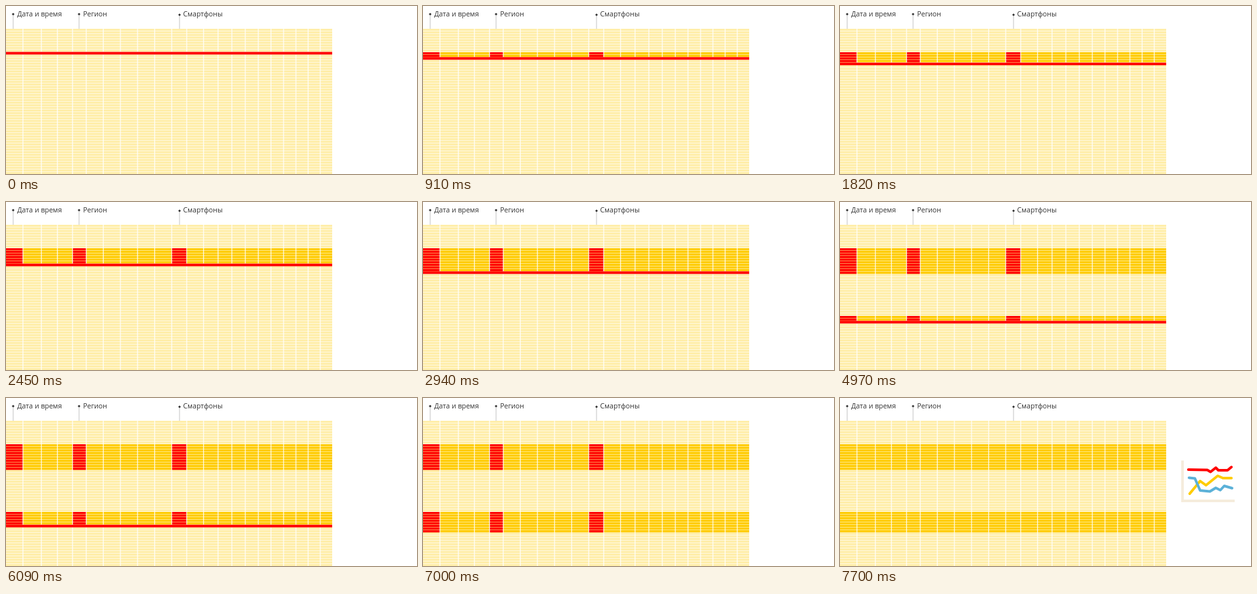
Recreate the animation shown at these times as an HTML page with a canvas. Size 630 px wide and 258 px high, loop 8.05 s.

```html
<!DOCTYPE html>
<html lang="ru">
<head>
<meta charset="utf-8">
<style>
html, body { margin: 0; width: 100%; height: 100%; overflow: hidden; background: #fff; }
canvas { display: block; width: 630px; height: 258px; }
</style>
</head>
<body>
<canvas id="stage" width="630" height="258"></canvas>
<script>
const ctx = document.getElementById('stage').getContext('2d');
const LOOP = 8050, TICK = 70, ROW_TIME = 350;
const TOP = 35, PITCH = 4, ROW_HEIGHT = 3.4, ROWS = 56, WIDTH = 500;
const RED = '#ff0000', YELLOW = '#ffcc00', PALE = '#ffeeaa', BLUE = '#5bb1d8';

const keyColumns = [
  { left: 0, right: 26 },
  { left: 102, right: 123 },
  { left: 254, right: 277 }
];
// Plain columns share the space after each key column; bend < 1 narrows them to the right.
const columnGroups = [
  { left: 26, right: 102, parts: 3, bend: 0.9 },
  { left: 123, right: 254, parts: 5, bend: 1 },
  { left: 277, right: WIDTH, parts: 11, bend: 0.9 }
];
const blocks = [
  { first: 9, count: 10, start: 140, last: 9, land: 2940, end: 4130 },
  { first: 35, count: 8, start: 4130, last: 8, land: 6930, end: 7000 }
];
const labels = [
  { text: 'Дата и время', x: 11, y: 12.5, gap: 6.2 },
  { text: 'Регион', x: 112, y: 12.5, gap: 6.2 },
  { text: 'Смартфоны', x: 266, y: 13.5, gap: 5.6 }
];
const curves = [
  { color: RED, points: [534, 110, 563, 110.5, 568, 113.5, 576, 107, 580, 111, 594, 111, 600, 106] },
  { color: YELLOW, points: [536, 147, 552, 127.5, 561, 134, 579, 119.5, 587, 123, 600, 123] },
  { color: BLUE, points: [535, 122.5, 544, 123.5, 552, 142, 567, 143.5, 576, 138, 583, 141.5, 589, 135, 601, 138.5] }
];

const clamp = v => Math.max(0, Math.min(1, v));
const rowY = row => TOP + row * PITCH;

function fillRows(first, count, left, right, color) {
  ctx.fillStyle = color;
  for (let row = first; row < first + count; row++) {
    ctx.fillRect(left, rowY(row), right - left, ROW_HEIGHT);
  }
}

// The bar rests on a row, creeps slightly, then snaps to the next one.
function scanRow(block, time) {
  if (time >= block.land) return block.last;
  const progress = Math.max(0, (time - block.start) / ROW_TIME);
  const row = Math.floor(progress);
  return row + 0.3 * (progress - row) ** 4;
}

function drawBlock(block, time, fade) {
  const done = time < block.end ? Math.floor(scanRow(block, time)) : block.count;
  fillRows(block.first, done, 0, WIDTH, YELLOW);
  ctx.globalAlpha = 1 - fade;
  for (const { left, right } of keyColumns) fillRows(block.first, done, left, right, RED);
  ctx.globalAlpha = 1;
}

function drawSeparators() {
  ctx.fillStyle = 'rgba(255,255,255,0.75)';
  for (const { left, right, parts, bend } of columnGroups) {
    for (let i = 0; i < parts; i++) {
      const x = left + (right - left) * (i / parts) ** bend;
      ctx.fillRect(x - 0.8, TOP, 1.6, ROWS * PITCH);
    }
  }
  for (const { left } of keyColumns.slice(1)) {
    ctx.fillRect(left - 0.8, TOP, 1.6, ROWS * PITCH);
  }
}

function drawBar(time) {
  const block = blocks.find(b => time < b.end);
  if (!block) return;
  ctx.fillStyle = RED;
  ctx.fillRect(0, rowY(block.first + scanRow(block, time)) - 0.5, WIDTH, 4);
}

function drawTable(time, fade) {
  fillRows(0, ROWS, 0, WIDTH, PALE);
  for (const block of blocks) drawBlock(block, time, fade);
  drawSeparators();
  drawBar(time);
}

function drawLabels() {
  ctx.font = '10.6px "Open Sans", "Noto Sans", sans-serif';
  for (const { text, x, y, gap } of labels) {
    ctx.fillStyle = '#c4c4c4';
    ctx.fillRect(x - 0.5, y, 1, TOP - y);
    ctx.fillStyle = '#333';
    ctx.beginPath();
    ctx.moveTo(x, y - 2);
    ctx.lineTo(x + 2, y);
    ctx.lineTo(x, y + 2);
    ctx.lineTo(x - 2, y);
    ctx.fill();
    ctx.fillText(text, x + gap, 15.5);
  }
}

function strokePath(points, color) {
  ctx.strokeStyle = color;
  ctx.beginPath();
  for (let i = 0; i < points.length; i += 2) ctx.lineTo(points[i], points[i + 1]);
  ctx.stroke();
}

function drawChart(alpha) {
  ctx.globalAlpha = alpha;
  ctx.lineWidth = 4;
  ctx.lineCap = 'butt';
  ctx.lineJoin = 'miter';
  strokePath([525, 96, 525, 158, 605, 158], '#f5ecdc');
  ctx.lineCap = ctx.lineJoin = 'round';
  for (const { color, points } of curves) strokePath(points, color);
  ctx.globalAlpha = 1;
}

function draw(now) {
  const time = Math.floor((now % LOOP) / TICK) * TICK;
  const fade = clamp((time - 7420) / 280);
  ctx.fillStyle = '#fff';
  ctx.fillRect(0, 0, 630, 258);
  drawTable(time, fade);
  drawLabels();
  drawChart(fade);
}

const begin = performance.now();
function loop() {
  draw(performance.now() - begin);
  requestAnimationFrame(loop);
}
loop();
</script>
</body>
</html>
```
